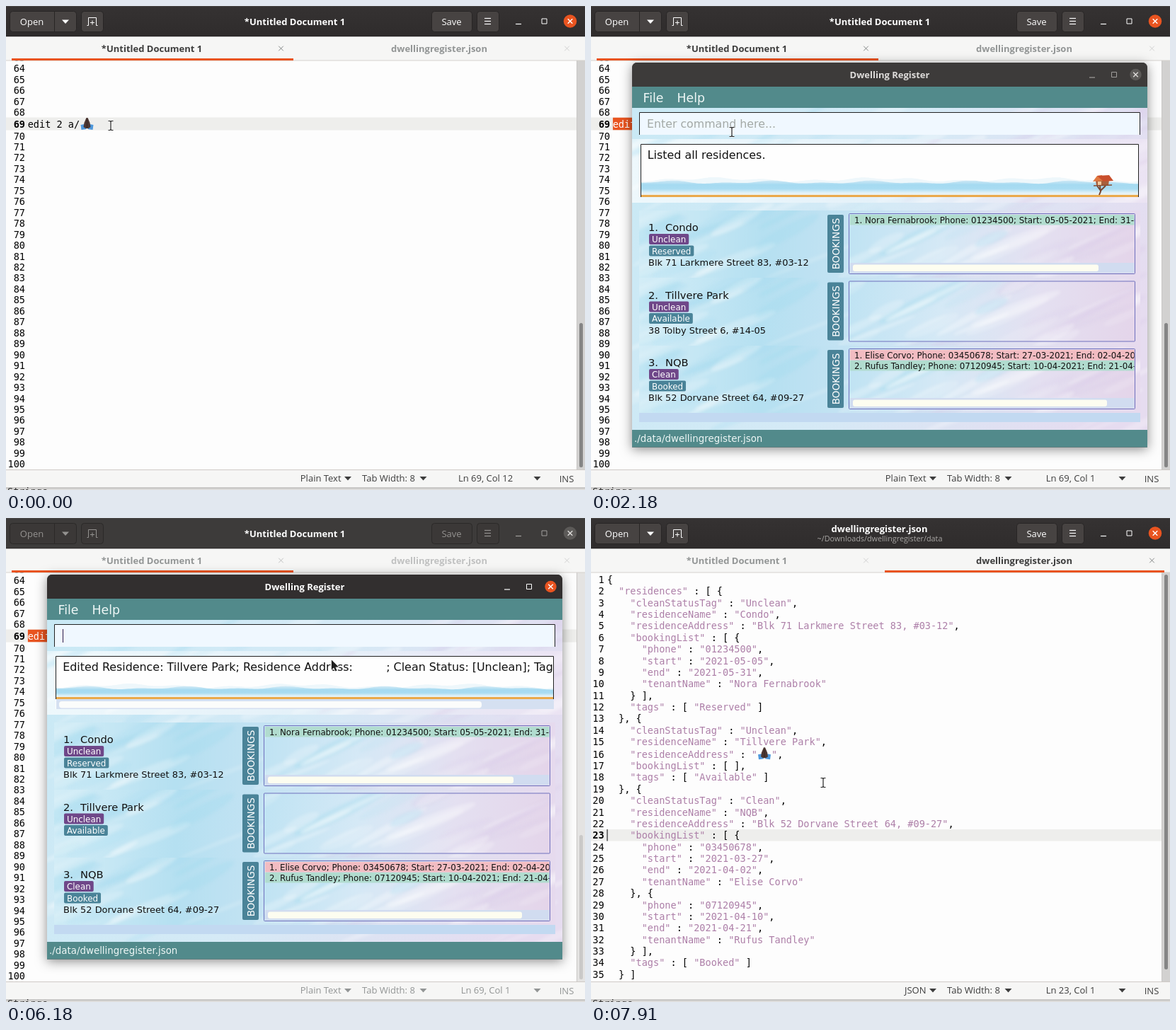
Write an HTML page with a canvas that moves like this. It is 818x684 px and loops after 7990 ms.

```html
<!DOCTYPE html>
<html lang="en">
<head>
<meta charset="utf-8">
<title>Dwelling Register</title>
<style>
html, body { margin: 0; width: 100%; height: 100%; overflow: hidden; background: #fff; }
canvas { display: block; }
</style>
</head>
<body>
<canvas id="stage" width="818" height="684"></canvas>
<script>
const ctx = document.getElementById('stage').getContext('2d');
const LOOP = 7990;
const ORANGE = '#e95420', TEAL = '#528a8b', FILE = 'dwellingregister.json';
const SANS = '"Open Sans", "Noto Sans", sans-serif';
const UI = '13px ' + SANS, UI_BOLD = 'bold 13px ' + SANS;
const MONO = '13.57px "DejaVu Sans Mono", monospace';
const app = size => size + 'px "DejaVu Sans", sans-serif';

const OLD_ADDRESS = '38 Tolby Street 6, #14-05', EMOJI = '@';
const homes = [
  { status: 'Unclean', name: 'Condo', address: 'Blk 71 Larkmere Street 83, #03-12', tag: 'Reserved', thumb: 717,
    bookings: [{ phone: '01234500', start: '2021-05-05', end: '2021-05-31', tenantName: 'Nora Fernabrook' }] },
  { status: 'Unclean', name: 'Tillvere Park', address: OLD_ADDRESS, tag: 'Available', bookings: [] },
  { status: 'Clean', name: 'NQB', address: 'Blk 52 Dorvane Street 64, #09-27', tag: 'Booked', thumb: 729,
    bookings: [
      { phone: '03450678', start: '2021-03-27', end: '2021-04-02', tenantName: 'Elise Corvo', late: true },
      { phone: '07120945', start: '2021-04-10', end: '2021-04-21', tenantName: 'Rufus Tandley' }] }
];

// Mouse stops: time, x, y
const path = [
  [0, 148, 169], [540, 148, 169], [860, 11.5, 157], [1000, 11.5, 157], [1240, 216, 181],
  [1940, 216, 181], [2180, 199, 178], [2450, 199, 178], [2560, 194.5, 176], [3900, 194.5, 176],
  [3980, 189, 195], [4140, 189, 195], [4420, 478, 212], [4690, 270, 262], [4870, 277, 453],
  [5100, 120, 448], [5350, 250, 458], [5630, 200, 450], [5750, 200, 450], [6420, 604, 62],
  [6800, 604, 62], [7150, 450, 260], [7500, 340, 450], [7600, 340, 450], [7850, 328, 374], [LOOP, 328, 374]
];

const ramp = (t, a, b) => Math.min(1, Math.max(0, (t - a) / (b - a)));

function mouseAt(t) {
  const i = Math.max(1, path.findIndex(p => p[0] > t));
  const [a, b] = [path[i - 1], path[i]], k = ramp(t, a[0], b[0]);
  return [a[1] + (b[1] - a[1]) * k, a[2] + (b[2] - a[2]) * k];
}

function mix(a, b, k) {
  const part = (c, i) => parseInt(c.substr(i, 2), 16);
  return 'rgb(' + [1, 3, 5].map(i => Math.round(part(a, i) + (part(b, i) - part(a, i)) * k)) + ')';
}

function box(x, y, w, h, fill, r = 0, stroke) {
  ctx.beginPath();
  ctx.roundRect(x, y, w, h, r);
  if (fill) { ctx.fillStyle = fill; ctx.fill(); }
  if (stroke) { ctx.strokeStyle = stroke; ctx.lineWidth = 1; ctx.stroke(); }
}

function text(s, x, y, font, color, align = 'left') {
  ctx.font = font;
  ctx.fillStyle = color;
  ctx.textAlign = align;
  ctx.fillText(s, x, y);
}

function lines(color, width, ...paths) {
  ctx.strokeStyle = color;
  ctx.lineWidth = width;
  ctx.beginPath();
  for (const p of paths)
    for (let i = 0; i < p.length; i += 2) ctx[i ? 'lineTo' : 'moveTo'](p[i], p[i + 1]);
  ctx.stroke();
}

function shape(color, ...p) {
  ctx.fillStyle = color;
  ctx.beginPath();
  for (let i = 0; i < p.length; i += 2) ctx.lineTo(p[i], p[i + 1]);
  ctx.fill();
}

function clipped(x, y, w, h, draw) {
  ctx.save();
  ctx.beginPath();
  ctx.rect(x, y, w, h);
  ctx.clip();
  draw();
  ctx.restore();
}

const arrowDown = (x, y, color) => shape(color, x - 5, y - 2.5, x + 5, y - 2.5, x, y + 3);
const cross = (x, y, r, color, w) => lines(color, w, [x - r, y - r, x + r, y + r], [x + r, y - r, x - r, y + r]);

// Soft watercolour, painted once: a gradient under blurred diagonal brush strokes
function wash(w, h, colors, seed, count) {
  const rnd = () => (seed = seed * 16807 % 2147483647) / 2147483647;
  const canvas = Object.assign(document.createElement('canvas'), { width: w, height: h });
  const g = canvas.getContext('2d'), fill = g.createLinearGradient(0, 0, w, h * 0.6);
  colors.forEach((c, i) => fill.addColorStop(i / (colors.length - 1), c));
  g.fillStyle = fill;
  g.fillRect(0, 0, w, h);
  g.filter = 'blur(2px)';
  for (let i = 0; i < count; i++) {
    const px = rnd(), py = rnd();
    g.globalAlpha = 0.12 + rnd() * 0.25;
    g.fillStyle = rnd() < 0.3 + py * 0.5 ? '#ffffff' : px < 0.55 ? '#a2daef' : '#d6c6e6';
    g.beginPath();
    g.ellipse(px * w, py * h, 25 + rnd() * 50, 2 + rnd() * 7, -0.35 - rnd() * 0.15, 0, 7);
    g.fill();
  }
  return canvas;
}

const paper = {
  body: wash(728, 455, ['#c9e9f5', '#d5eaf6', '#e6dcf0'], 9, 110),
  result: wash(728, 90, ['#eef8fc', '#e4f1f9', '#ebe3f3'], 23, 35),
  card: wash(708, 96, ['#d3edf7', '#b5e0f1', '#cbe4f4', '#dfe0f1', '#e6daee'], 41, 40),
  list: wash(405, 85, ['#bfe3f3', '#d5e9f6', '#e4e0f1', '#e4d5ea'], 77, 28)
};

function windowButtons(min, max, close, y, r, k) {
  const c = mix('#a09e9c', '#ffffff', k);
  lines(c, 1.2, [min - 4, y + 4, min + 4, y + 4]);
  box(max - 3.5, y - 3.5, 7, 7, null, 0, c);
  ctx.fillStyle = mix('#5c5a58', ORANGE, k);
  ctx.beginPath();
  ctx.arc(close, y, r, 0, 7);
  ctx.fill();
  cross(close, y, 3.3, mix('#dddbd9', '#ffffff', k), 1.4);
}

function hands(x, y) {
  shape('#4f98dc', x, y + 10, x + 5, y + 9, x + 8, y + 16, x + 1, y + 17);
  shape('#4f98dc', x + 18, y + 10, x + 13, y + 9, x + 10, y + 16, x + 17, y + 17);
  shape('#4b3632', x + 8, y, x + 10, y, x + 13, y + 7, x + 14, y + 13, x + 11, y + 15,
    x + 7, y + 15, x + 4, y + 13, x + 5, y + 7);
  lines('#2f211f', 0.8, [x + 9, y + 2, x + 9, y + 14]);
}

function jsonLines(address) {
  const out = ['{', '  "residences" : [ {'];
  homes.forEach((h, i) => {
    const field = (pad, key, value, end = ',') => out.push(`${pad}"${key}" : "${value}"${end}`);
    const pad = '    ', deep = '      ';
    field(pad, 'cleanStatusTag', h.status);
    field(pad, 'residenceName', h.name);
    field(pad, 'residenceAddress', i === 1 ? address : h.address);
    out.push(pad + '"bookingList" : [ ' + (h.bookings.length ? '{' : '],'));
    h.bookings.forEach((b, j) => {
      for (const key of ['phone', 'start', 'end']) field(deep, key, b[key]);
      field(deep, 'tenantName', b.tenantName, '');
      out.push(pad + (j < h.bookings.length - 1 ? '}, {' : '} ],'));
    });
    out.push(`${pad}"tags" : [ "${h.tag}" ]`, i < 2 ? '  }, {' : '  } ]');
  });
  return out;
}

function drawJson(t) {
  const fresh = t >= 7600, shift = fresh ? 1.2 : 0;
  box(0, 438.8 + shift, 806, 16.4, '#eeeeec');
  box(22.5, 438.8 + shift, 1, 16.4, '#000');
  jsonLines(fresh ? EMOJI : OLD_ADDRESS).forEach((row, i) => {
    const y = 92 + i * 16.37 + (i > 14 ? shift : 0);
    text(i + 1, 18.7, y, (i === 22 ? 'bold ' : '') + MONO, '#000', 'right');
    let x = 22.7;
    for (const part of row.split(/("[^"]*")/)) {
      part.split(EMOJI).forEach((piece, j) => {
        if (j) {
          hands(x + 1, y - 14.5);
          x += 20;
        }
        text(piece, x, y, MONO, part[0] === '"' ? '#ad7fa8' : '#000');
        x += ctx.measureText(piece).width;
      });
    }
  });
}

function selectionStart(t) {
  if (t < 540) return 125;
  if (t >= 860) return 30.7;
  const x = mouseAt(t)[0];
  if (x > 104) return x > 115 ? 125 : 104.2;
  return 30.7 + Math.max(0, Math.round((x - 30.7) / 8.17)) * 8.17;
}

function drawBlankDoc(t) {
  box(0, 157.5, 806, 18, '#eeeeec');
  for (let n = 63; n <= 100; n++) {
    const y = n < 69 ? 93 + (n - 64) * 15.5 : n === 69 ? 172.2 : 188.5 + (n - 70) * 15.46;
    text(n, 27, y, (n === 69 ? 'bold ' : '') + MONO, '#000', 'right');
  }
  const row = color => text('edit 2 a/', 30.7, 172.2, MONO, color), from = selectionStart(t);
  row('#000');
  if (from < 125) clipped(from, 157.5, 125 - from, 18, () => {
    box(from, 157.5, 95, 18, ORANGE);
    row('#fff');
  });
  hands(105.5, 158);
  if (t >= 310 && t < 540) box(125, 157.5, 1, 18, '#000');
}

function drawEditor(t) {
  const json = t >= 6640;
  const k = t < 6000 ? 1 - ramp(t, 2230, 2450) : ramp(t, 6440, 6490);
  const kb = t < 6000 ? k : ramp(t, 6505, 6590);

  box(0, 77, 818, 578, '#fdfdfd');
  clipped(0, 77.5, 818, 577, () => json ? drawJson(t) : drawBlankDoc(t));
  box(806, 77, 12, 578, mix('#e4e3e2', '#d2d1d0', k));
  box(806, 77, 1, 578, '#c9c7c5');
  const thumb = mix('#cac9c8', '#858585', k);
  if (json) box(810, 80, 5, 558, thumb, 2.5);
  else box(810, 448, 5, 204, thumb, 2.5);

  // Header bar
  const head = ctx.createLinearGradient(0, 0, 0, 43);
  head.addColorStop(0, mix('#3d3b3a', '#353232', k));
  head.addColorStop(1, mix('#3d3b3a', '#2f2c2c', k));
  box(0, 0, 818, 43, head);
  box(0, 0, 818, 1, '#4a4746');
  box(0, 42.5, 818, 1, '#242121');
  const ink = mix('#949290', '#ffffff', kb);
  const fill = mix('#3b3837', '#474342', kb), edge = mix('#2b2928', '#282525', kb);
  const button = (x, w, r = 4) => box(x + 0.5, 7.5, w - 1, 29, fill, r, edge);
  button(5, 64, [4, 0, 0, 4]);
  button(68, 32, [0, 4, 4, 0]);
  button(106, 32);
  button(601, 58);
  button(665, 32);
  text('Open', 36.5, 26.5, UI, ink, 'center');
  text('Save', 629.5, 26.5, UI, ink, 'center');
  arrowDown(84, 22, ink);
  lines(ink, 1, [114.5, 27.5, 116.5, 27.5, 116.5, 16.5, 127.5, 16.5, 127.5, 27.5, 129.5, 27.5],
    [119, 23.5, 125, 23.5], [122, 20.5, 122, 26.5]);
  for (const y of [17.5, 21.5, 25.5]) lines(ink, 1.2, [676, y, 685, y]);
  windowButtons(724, 760.5, 797, 21.5, 9.3, k);
  if (json) {
    text(FILE, 407.5, 20, UI_BOLD, '#fff', 'center');
    text('~/Downloads/dwellingregister/data', 408, 33, '10.8px ' + SANS, '#a9a7a5', 'center');
  } else text('*Untitled Document 1', 408, 26.5, UI_BOLD, '#fff', 'center');

  // Tabs
  box(0, 43.5, 818, 33.5, '#f6f6f5');
  box(0, 76.5, 818, 1, '#d5d1cd');
  const tab = (s, x, closeX, on) => {
    const active = mix('#929595', '#3d3d3d', k);
    text(s, x, 64.5, UI_BOLD, on ? active : mix('#c0c1c1', '#929595', k), 'center');
    cross(closeX, 60, 3.3, on ? mix('#c0c1c1', '#858888', k) : '#d2d2d2', 1);
  };
  tab('*Untitled Document 1', 206, 388.5, !json);
  tab(FILE, 612, 792.5, json);
  box(json ? 415 : 8, 74, json ? 395 : 398, 3, ORANGE);

  // Status bar
  const label = mix('#929595', '#3d3d3d', k);
  box(0, 655, 818, 26, '#f6f6f5');
  box(0, 655, 818, 1, '#cfcac6');
  text(json ? 'JSON' : 'Plain Text', 473.5, 672, UI, label, 'right');
  text('Tab Width: 8', 503, 672, UI, label);
  for (const x of [483, 589.5, 750.5]) arrowDown(x, 667.5, label);
  const col = Math.min(12, 1 + Math.round((selectionStart(t) - 30.7) / 8.17));
  text(json ? 'Ln 23, Col 1' : 'Ln 69, Col ' + col, 677.5, 672, UI, label, 'center');
  text('INS', 792, 672.5, UI, label, 'center');
  box(0, 681, 818, 3, '#dcdbda');
  box(0, 680.5, 818, 1, '#a5a3a1');
  text('Strings', 2, 691, MONO, '#333');
}

function sea(bottom, height) {
  const wave = (lift, size, step, color) => {
    const p = [71, bottom];
    for (let x = 71; x <= 774; x += 3)
      p.push(x, bottom - lift * height + size * (Math.sin(x / step) + 0.7 * Math.sin(x / 11 + lift * 9)));
    shape(color, ...p, 774, bottom);
  };
  const water = ctx.createLinearGradient(0, bottom - height, 0, bottom);
  ['#eef7fb', '#cde8f5', '#a5daf1', '#a9dcf2', '#e2f2f8', '#f8eedb'].forEach((c, i) => water.addColorStop(i / 5, c));
  wave(0.85, 2, 37, '#eef7fb');
  wave(0.72, 1.5, 23, water);
  ctx.globalAlpha = 0.5;
  wave(0.5, 1, 29, water);
  ctx.globalAlpha = 1;
  box(71, bottom - 3, 703, 3, '#eaa94b');
}

function hut() {
  lines('#7a4630', 2, [718, 267, 720, 262, 719, 254], [715, 254, 720, 261, 727, 254]);
  shape('#a85f3c', 713, 247, 732, 246, 731, 253, 714, 253);
  shape('#f2c79a', 716, 248, 721, 248, 721, 253, 716, 253);
  lines('#8a4c30', 1.4, [710, 254, 736, 253]);
  shape('#e07840', 709, 248, 715, 240, 722, 239, 724, 247);
  shape('#c94f2c', 715, 240, 732, 239, 738, 247, 724, 248);
}

function drawCard(h, i, edited) {
  const y = 279 + i * 95.5, white = '#fff';
  ctx.drawImage(paper.card, 68, y + 9.5);
  text(`${i + 1}.`, 81, y + 39, app(14.7), '#111');
  text(h.name, 105, y + 39, app(14.7), '#111');
  const tag = (s, ty, color) => {
    ctx.font = app(11.9);
    box(82, ty, ctx.measureText(s).width + 8, 15, color, 2);
    text(s, 86, ty + 12, app(11.9), white);
  };
  tag(h.status, y + 43, '#6f4789');
  tag(h.tag, y + 59.5, '#4a8398');
  if (i !== 1 || !edited) text(h.address, 81, y + 88, app(12.95), '#111');

  box(334, y + 16, 23, 82, '#4a8398', 2);
  ctx.save();
  ctx.translate(351, y + 57);
  ctx.rotate(-Math.PI / 2);
  text('BOOKINGS', 0, 0, app(13.6), white, 'center');
  ctx.restore();

  ctx.drawImage(paper.list, 364, y + 14.5);
  box(364.5, y + 14.5, 404, 85, null, 1, '#6f70bd');
  clipped(366, y + 15, 401.5, 84, () => {
    h.bookings.forEach((b, j) => {
      const date = s => s.split('-').reverse().join('-'), by = y + 16 + j * 15;
      box(366, by, 402, 14.5, b.late ? '#f2bcc2' : '#b1dccf');
      text(`${j + 1}. ${b.tenantName}; Phone: ${b.phone}; Start: ${date(b.start)}; End: ${date(b.end)}`,
        372, by + 11.7, app(11.8), '#111');
    });
    if (h.thumb) {
      box(366, y + 84, 402, 14.5, '#d1dcf0');
      box(370, y + 86.5, h.thumb - 370, 9.5, '#fdfdf0', 3);
    }
  });
}

function drawField(t) {
  box(68, 150, 708, 32, '#f0f8ff');
  lines('#222', 1, [68.5, 182, 68.5, 150.5, 775.5, 150.5, 775.5, 182]);
  const pasted = t >= 3080 && t < 3750;
  if (t < 2240) text('Enter command here...', 79, 172, app(15.8), '#a3a9a5');
  else if (pasted) text('edit 2 a/', 79.3, 172, app(15.8), '#2e1a47');
  const since = t < 3750 ? t - 2230 : t - 3750;
  if (t >= 2240 && (pasted || since % 1000 < 500)) box(pasted ? 184 : 80, 157, 1, 19, '#2e1a47');
}

function drawResult(edited) {
  const bottom = edited ? 256 : 270;
  box(70, 195, 704, 75, '#fefefe');
  clipped(71, 195, 703, 75, () => {
    sea(bottom, edited ? 22 : 29);
    if (edited) {
      text(`Edited Residence: ${homes[1].name}; Residence Address:`, 80.2, 216, app(15.9), '#111');
      text('; Clean Status: [Unclean]; Tags: [Available]', 537.2, 216, app(15.9), '#111');
      box(71, 256, 703, 14, '#d5e0f1');
      box(75, 259, 597, 9.5, '#fbfcfb', 4);
    } else {
      hut();
      text('Listed all residences.', 79.7, 216, app(15.9), '#111');
    }
  });
  lines('#222', 1, [70.5, bottom, 70.5, 195.5, 773.5, 195.5, 773.5, bottom]);
}

function drawApp(t) {
  const k = ramp(t, 2230, 2450), edited = t >= 3750;
  ctx.save();
  ctx.shadowColor = 'rgba(0,0,0,.45)';
  ctx.shadowBlur = 16;
  ctx.shadowOffsetY = 3;
  box(58, 80, 728, 543.5, '#333', [7, 7, 0, 0]);
  ctx.restore();
  box(58, 80, 728, 35, mix('#3d3b3a', '#322f2f', k), [7, 7, 0, 0]);
  text('Dwelling Register', 422, 102, UI_BOLD, mix('#dedcda', '#ffffff', k), 'center');
  windowButtons(708, 739, 769.5, 97, 8.2, k);

  box(58, 114, 728, 30, TEAL);
  text('File', 73.5, 136, app(17.3), '#eef7f6');
  text('Help', 121.5, 136, app(17.3), '#eef7f6');
  ctx.drawImage(paper.body, 58, 144);
  ctx.drawImage(paper.result, 58, 188);
  drawField(t);
  drawResult(edited);
  homes.forEach((h, i) => drawCard(h, i, edited));
  box(68, 575, 708, 13, '#c2d9f1');
  box(58, 599, 728, 24.5, TEAL);
  text('./data/' + FILE, 61, 616, app(13.4), '#eef7f6');
}

function drawMouse(t) {
  const [x, y] = mouseAt(t);
  const overResult = t < 5000 && x > 70 && y > 196 && y < 256;
  if (t < 3940 || t > 6880 || overResult) {
    const beam = [[x - 3.5, y - 6.5, x - 1, y - 6.5, x, y - 5.5, x, y + 5.5, x - 1, y + 6.5, x - 3.5, y + 6.5],
      [x + 3.5, y - 6.5, x + 1, y - 6.5, x, y - 5.5], [x, y + 5.5, x + 1, y + 6.5, x + 3.5, y + 6.5]];
    lines('rgba(255,255,255,.7)', 2.6, ...beam);
    lines('#222', 1.2, ...beam);
    return;
  }
  const tip = [x, y, x, y + 14, x + 3.2, y + 11, x + 5.5, y + 16, x + 7.7, y + 15, x + 5.5, y + 10.3, x + 10, y + 10];
  lines('#fff', 1.6, [...tip, x, y]);
  shape('#1c1c1c', ...tip);
}

function frame(now) {
  const t = now % LOOP;
  drawEditor(t);
  if (t >= 2120 && t < 6440) drawApp(t);
  drawMouse(t);
  requestAnimationFrame(frame);
}
requestAnimationFrame(frame);
</script>
</body>
</html>
```
